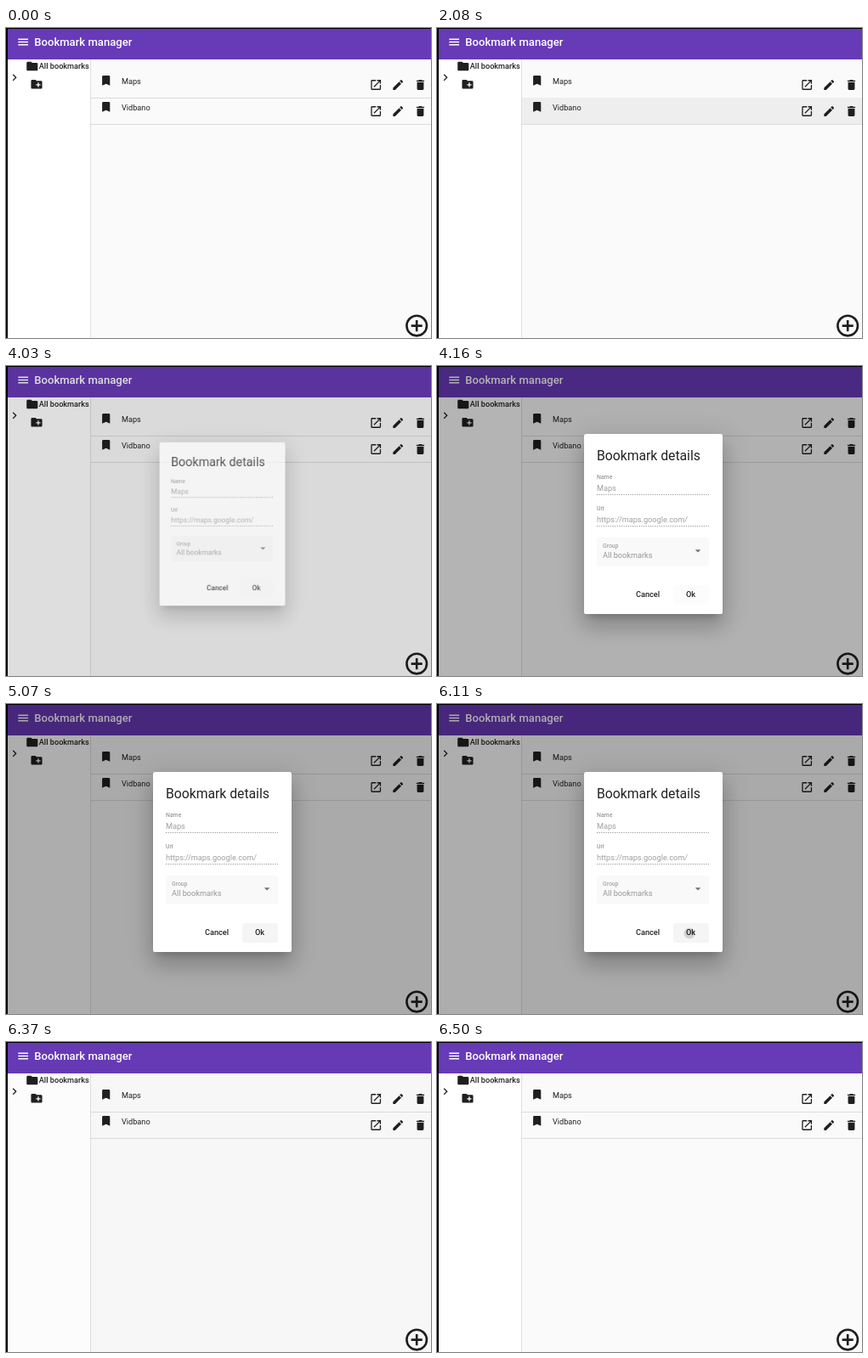
An HTML page with a canvas for the animation above (9490 ms loop, 500 px wide and 365 px high).

```html
<!DOCTYPE html>
<html lang="en">
<head>
<meta charset="utf-8">
<title>Bookmark manager</title>
<style>
  html, body { margin: 0; width: 100%; height: 100%; overflow: hidden; background: #000; }
  canvas { display: block; }
</style>
</head>
<body>
<canvas id="stage" width="500" height="365"></canvas>
<script>
const W = 500, H = 365, LOOP = 9490, TICK = 130;
const UI = 0.655; // page zoom
const OPEN_AT = 3979, CLOSE_AT = 6143, PRESS_AT = 6110;
const INK = 'rgba(0,0,0,.87)';

const ctx = document.getElementById('stage').getContext('2d');

const icon = d => new Path2D(d);
const ICONS = {
  menu: icon('M3 18h18v-2H3v2zm0-5h18v-2H3v2zm0-7v2h18V6H3z'),
  chevron: icon('M10 6L8.59 7.41 13.17 12l-4.58 4.59L10 18l6-6z'),
  folder: icon('M10 4H4c-1.1 0-2 .9-2 2v12c0 1.1.9 2 2 2h16c1.1 0 2-.9 2-2V8c0-1.1-.9-2-2-2h-8l-2-2z'),
  newFolder: icon('M20 6h-8l-2-2H4c-1.1 0-2 .9-2 2v12c0 1.1.9 2 2 2h16c1.1 0 2-.9 2-2V8c0-1.1-.9-2-2-2zm-1 8h-3v3h-2v-3h-3v-2h3V9h2v3h3v2z'),
  bookmark: icon('M17 3H7c-1.1 0-2 .9-2 2v16l7-3 7 3V5c0-1.1-.9-2-2-2z'),
  open: icon('M19 19H5V5h7V3H5c-1.1 0-2 .9-2 2v14c0 1.1.9 2 2 2h14c1.1 0 2-.9 2-2v-7h-2v7zM14 3v2h3.59l-9.83 9.83 1.41 1.41L19 6.41V10h2V3h-7z'),
  edit: icon('M3 17.25V21h3.75L17.81 9.94l-3.75-3.75L3 17.25zM20.71 7.04c.39-.39.39-1.02 0-1.41l-2.34-2.34c-.39-.39-1.02-.39-1.41 0l-1.83 1.83 3.75 3.75 1.83-1.83z'),
  trash: icon('M6 19c0 1.1.9 2 2 2h8c1.1 0 2-.9 2-2V7H6v12zM19 4h-3.5l-1-1h-5l-1 1H5v2h14V4z'),
  add: icon('M13 7h-2v4H7v2h4v4h2v-4h4v-2h-4V7zm-1-5a10 10 0 1 0 0 20a10 10 0 1 0 0-20zm0 18a8 8 0 1 1 0-16a8 8 0 1 1 0 16z')
};

function bezier(x1, y1, x2, y2) {
  const at = (a, b, s) => 3 * a * s * (1 - s) ** 2 + 3 * b * s * s * (1 - s) + s ** 3;
  return x => {
    if (x <= 0) return 0;
    if (x >= 1) return 1;
    let lo = 0, hi = 1;
    for (let i = 0; i < 24; i++) {
      const mid = (lo + hi) / 2;
      if (at(x1, x2, mid) < x) lo = mid; else hi = mid;
    }
    return at(y1, y2, lo);
  };
}
const fadeEase = bezier(0.25, 0.8, 0.25, 1);
const enterEase = bezier(0, 0, 0.2, 1);

function box(c, x, y, w, h, color) {
  c.fillStyle = color;
  c.fillRect(x, y, w, h);
}

function roundBox(c, x, y, w, h, r, color) {
  c.fillStyle = color;
  c.beginPath();
  c.roundRect(x, y, w, h, r);
  c.fill();
}

function label(c, text, x, y, size, color = INK, weight = 400) {
  c.font = `${weight} ${size * UI}px Roboto, sans-serif`;
  c.fillStyle = color;
  c.fillText(text, x, y);
}

function drawIcon(name, cx, cy, color = '#1f1f1f', scale = UI) {
  ctx.save();
  ctx.translate(cx, cy);
  ctx.scale(scale, scale);
  ctx.translate(-12, -12);
  ctx.fillStyle = color;
  ctx.fill(ICONS[name]);
  ctx.restore();
}

function drawRow(title, top, hovered) {
  if (hovered) box(ctx, 100, top, 400, 31, '#eeeeee');
  box(ctx, 100, top + 31, 400, 1, '#dcdcdc');
  drawIcon('bookmark', 117.7, top + 10.8);
  label(ctx, title, 136, top + 14.6, 14);
  drawIcon('open', 435.2, top + 16);
  drawIcon('edit', 461.2, top + 16);
  drawIcon('trash', 487.5, top + 16);
}

function drawPage(t) {
  box(ctx, 0, 0, W, H, '#000');
  box(ctx, 2, 1, 498, 36, '#673ab7');
  box(ctx, 2, 37, 97, 328, '#fff');
  box(ctx, 99, 37, 1, 328, '#e0e0e0');
  box(ctx, 100, 37, 400, 328, '#fafafa');

  drawIcon('menu', 20.2, 16.5, '#fff');
  label(ctx, 'Bookmark manager', 33.2, 21, 20, '#fff', 500);
  drawIcon('folder', 30.8, 45);
  label(ctx, 'All bookmarks', 38.7, 48, 14, INK, 500);
  drawIcon('chevron', 10, 58.3);
  drawIcon('newFolder', 36, 66.2);

  drawRow('Maps', 51, t >= 2340 && t < 4030);
  drawRow('Vidbano', 82, t >= 2080 && t < 2340);
  drawIcon('add', 483.2, 350.6, '#1f1f1f', 2 * UI);
}

const layer = document.createElement('canvas');
layer.width = W;
layer.height = H;
const dlg = layer.getContext('2d');

function dropShadow(dy, blur, spread, alpha) {
  dlg.save();
  dlg.shadowColor = `rgba(0,0,0,${alpha})`;
  dlg.shadowBlur = blur * UI;
  dlg.shadowOffsetX = 2 * W;
  dlg.shadowOffsetY = dy * UI;
  const s = spread * UI;
  roundBox(dlg, 173 - s - 2 * W, 80 - s, 163 + 2 * s, 212 + 2 * s, 2.6, '#000');
  dlg.restore();
}

function drawField(name, value, y) {
  label(dlg, name, 188, y, 10.5, 'rgba(0,0,0,.5)');
  label(dlg, value, 188, y + 13.8, 14, 'rgba(0,0,0,.38)');
  dlg.save();
  dlg.strokeStyle = 'rgba(0,0,0,.42)';
  dlg.setLineDash([1.2, 1.42]);
  dlg.beginPath();
  dlg.moveTo(188, y + 18.5);
  dlg.lineTo(320, y + 18.5);
  dlg.stroke();
  dlg.restore();
}

function drawDialog(t) {
  dlg.clearRect(0, 0, W, H);
  dropShadow(11, 15, -7, 0.2);
  dropShadow(24, 38, 3, 0.14);
  dropShadow(9, 46, 8, 0.12);
  roundBox(dlg, 173, 80, 163, 212, 2.6, '#fff');

  label(dlg, 'Bookmark details', 188, 111.4, 24);
  drawField('Name', 'Maps', 133);
  drawField('Url', 'https://maps.google.com/', 170);

  roundBox(dlg, 188, 202, 132, 33, [2.6, 2.6, 0, 0], 'rgba(0,0,0,.025)');
  label(dlg, 'Group', 195, 213.8, 10.5, 'rgba(0,0,0,.42)');
  label(dlg, 'All bookmarks', 195, 225.7, 14, 'rgba(0,0,0,.4)');
  dlg.fillStyle = 'rgba(0,0,0,.54)';
  dlg.beginPath();
  dlg.moveTo(303.7, 216.2);
  dlg.lineTo(310.3, 216.2);
  dlg.lineTo(307, 219.5);
  dlg.fill();

  const hover = t < 4940 ? 0.01 : t < 5070 ? 0.025 : 0.04;
  roundBox(dlg, 278, 258, 42, 23, 2.6, `rgba(0,0,0,${hover})`);
  if (t >= PRESS_AT) {
    dlg.fillStyle = 'rgba(0,0,0,.14)';
    dlg.beginPath();
    dlg.arc(297, 270, 6.5, 0, 2 * Math.PI);
    dlg.fill();
  }
  label(dlg, 'Cancel', 234, 272, 14, INK, 500);
  label(dlg, 'Ok', 293, 272, 14, INK, 500);

  const p = enterEase((t - OPEN_AT) / 150);
  const scale = 0.7 + 0.3 * p;
  ctx.save();
  ctx.globalAlpha = p;
  ctx.translate(254.5, 186);
  ctx.scale(scale, scale);
  ctx.drawImage(layer, -254.5, -186);
  ctx.restore();
}

function render(now) {
  const t = Math.floor((now % LOOP) / TICK) * TICK;
  drawPage(t);
  const shade = 0.32 * (fadeEase((t - OPEN_AT) / 400) - fadeEase((t - CLOSE_AT) / 400));
  if (shade > 0 && t < 6500) box(ctx, 2, 1, W - 2, H - 1, `rgba(0,0,0,${shade})`);
  if (t >= OPEN_AT && t < CLOSE_AT) drawDialog(t);
}

let start;
function frame(now) {
  start ??= now;
  render(now - start);
  requestAnimationFrame(frame);
}
requestAnimationFrame(frame);
</script>
</body>
</html>
```
